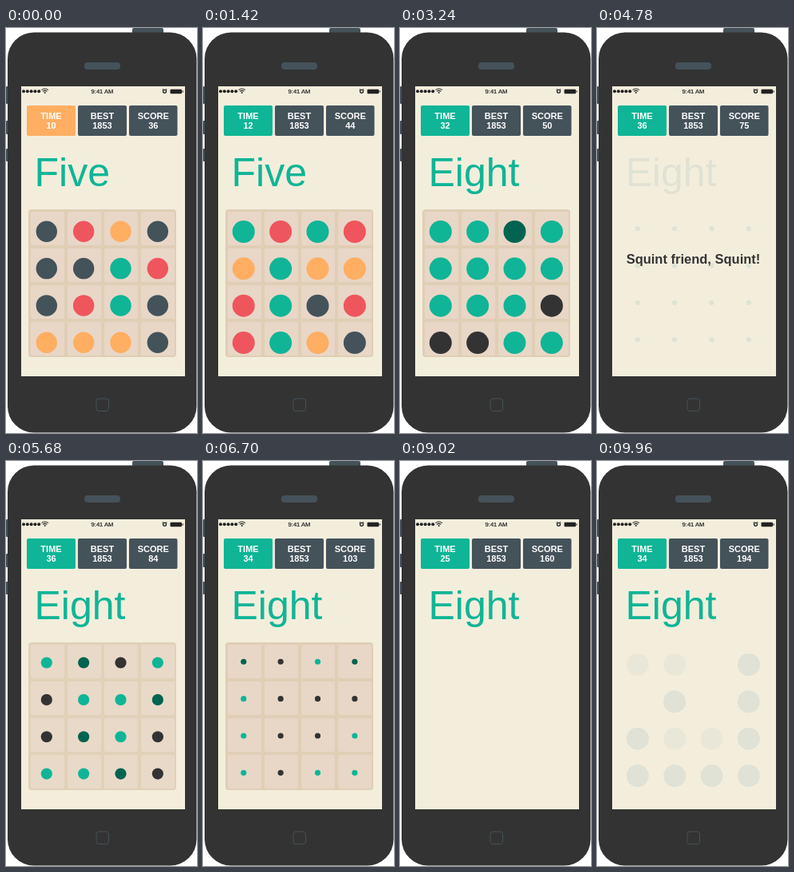
Animation of 239 by 507 pixels, one loop 9980 ms. Source, as an HTML page:

```html
<!DOCTYPE html>
<html lang="en">
<head>
<meta charset="utf-8">
<title>Dot game</title>
<style>
  html, body { margin: 0; width: 100%; height: 100%; overflow: hidden; background: #fff; }
  svg { display: block; width: 239px; height: 507px; }
  text { font-family: "Liberation Sans", Arial, sans-serif; }
  .stat { font-size: 11px; font-weight: bold; fill: #fff; text-anchor: middle; }
  .slate { fill: #44525a; }
</style>
</head>
<body>
<svg viewBox="0 0 239 507">
  <g class="slate">
    <rect x="158" y="0" width="39" height="8" rx="2"/>
    <rect x="0" y="73" width="5" height="22" rx="1"/>
    <rect x="0" y="116" width="5" height="17" rx="1"/>
    <rect x="0" y="151" width="5" height="16" rx="1"/>
  </g>
  <rect x="2" y="5.5" width="236.5" height="501" rx="33" fill="#333"/>
  <rect class="slate" x="98" y="43" width="45" height="9" rx="4"/>
  <rect x="113" y="464" width="15.5" height="15.5" rx="3" fill="none" stroke="#44525a"/>
  <rect x="19" y="73" width="205" height="363" fill="#f3eedc"/>

  <g id="status" fill="#222">
    <path d="M44.5 77.6Q48.7 74.4 52.9 77.6M46 79.4Q48.7 77.3 51.4 79.4" fill="none" stroke="#222" stroke-width="1.1"/>
    <circle cx="48.7" cy="81.1" r="1"/>
    <text x="120.5" y="82.2" font-size="7.6" text-anchor="middle" stroke="#222" stroke-width=".2">9:41 AM</text>
    <circle cx="198.5" cy="79.3" r="2" fill="none" stroke="#222" stroke-width="1.3"/>
    <path d="M195.7 77.5l1.4-1.4M201.3 77.5l-1.4-1.4" stroke="#222"/>
    <rect x="205.5" y="76.7" width="14.5" height="5.6" rx="1"/>
    <rect x="220.5" y="78.4" width="1.2" height="2.2"/>
  </g>

  <rect id="timeBox" x="26" y="97" width="61" height="38" rx="2"/>
  <rect class="slate" x="90" y="97" width="61" height="38" rx="2"/>
  <rect class="slate" x="154" y="97" width="60.5" height="38" rx="2"/>
  <g class="stat">
    <text x="56.5" y="114">TIME</text><text id="time" x="56.5" y="126"></text>
    <text x="120.5" y="114">BEST</text><text x="120.5" y="126">1853</text>
    <text x="184.3" y="114">SCORE</text><text id="score" x="184.3" y="126"></text>
  </g>

  <text id="word" x="35.5" y="198" font-size="50"></text>
  <g id="board"><rect x="28" y="227" width="185" height="185" rx="4" fill="#e0ceb5"/></g>
  <g id="dots"></g>
  <text id="message" x="120.5" y="295" font-size="16.5" font-weight="bold" fill="#333" text-anchor="middle">Squint friend, Squint!</text>
</svg>
<script>
const LOOP = 9980, R = 14, GROW = 160, SHRINK = 100, TAP = 120;
const GREEN = '#0fb596', ORANGE = '#ffae62', FAINT = '#dfe2d4';
const COLOR = {
  g: GREEN, o: ORANGE, r: '#ef555d', k: '#44525a',
  n: '#333', d: '#006450', s: FAINT, p: '#e9e8d8', '.': 'none'
};
const MESSAGE = [4500, 5050];

// start, word, score, time, cell colours, taps (hex cell + new colour), board shown
const rounds = [
  [-150, 'Five', 36, 10, 'krokkkgrkrgkoook', '2g8gdg', 1],
  [720, 'Five', 44, 12, 'rrorogoorgkrrkok', '0g2gdg', 1],
  [1540, 'Five', 47, 13, 'okrgrkogkorkgrko', '1g6g', 1],
  [2400, 'Eight', 50, 33, '', '', 0],
  [2890, 'Eight', 50, 32, 'gggggggggggnnngg', '2d7d9d0def', 1],
  [4150, 'Eight', 62, 34, 'gndggngdgnggdnnd', 'dg', 1],
  [4500, 'Eight', 75, 36, '', '', 0],
  [4745, 'Eight', 75, 36, 'ssssssssssssssss', '1p6p8pbp', 0],
  [5600, 'Eight', 84, 36, 'gdngnggdndgnggdn', '1g7g', 1],
  [6130, 'Eight', 92, 35, 'ngdggndngdngnndg', '0g5g', 1],
  [6660, 'Eight', 103, 34, 'dngdgnnngnnggngg', '1d1g', 1],
  [7260, 'Eight', 121, 31, 'gnggdngnnggdngnn', '4gdn9g', 1],
  [7820, 'Eight', 139, 29, 'ndgngdgngnndggdn', '1g8n3g', 1],
  [8380, 'Eight', 150, 27, 'gdngngdngndgngdn', '6gcg', 1],
  [8920, 'Eight', 160, 25, '', '', 0],
  [9100, 'Eight', 177, 30, 'ssps.spss.psspss', '2s7p', 0],
  [9560, 'Eight', 194, 34, 'pp.s.s.ssppsssss', '', 0]
].map(([start, word, score, time, cells, taps, board], i, all) => {
  const end = i + 1 < all.length ? all[i + 1][0] : LOOP + 200;
  const steps = taps.match(/../g) || [];
  const gap = (end - start - 300) / steps.length;
  return {
    start, end, word, score, time, cells, board,
    taps: steps.map(([cell, color], k) => ({ cell: parseInt(cell, 16), color, at: start + 170 + gap * k }))
  };
});

const $ = id => document.getElementById(id);
const clamp = v => Math.max(0, Math.min(1, v));
const add = (parent, tag, attrs = {}) => {
  const el = document.createElementNS('http://www.w3.org/2000/svg', tag);
  for (const k in attrs) el.setAttribute(k, attrs[k]);
  return parent.appendChild(el);
};

for (let i = 0; i < 5; i++) add($('status'), 'circle', { cx: 22 + 4.8 * i, cy: 79.3, r: 2 });

const dots = Array.from({ length: 16 }, (_, i) => {
  const col = i % 4, row = i >> 2;
  add($('board'), 'rect', { x: 31 + 46 * col, y: 230 + 46 * row, width: 42, height: 42, rx: 2, fill: '#e8d7c7' });
  return {
    x: 50.8 + 46.35 * col, y: 250 + 46.35 * row,
    base: add($('dots'), 'circle'), top: add($('dots'), 'circle')
  };
});

function place(el, dot, r, color) {
  el.setAttribute('cx', dot.x);
  el.setAttribute('cy', dot.y + 5 * r / R);
  el.setAttribute('r', r);
  el.setAttribute('fill', COLOR[color] || 'none');
}

function drawDots(round, t) {
  const size = R * Math.min(clamp((t - round.start) / GROW), clamp((round.end - t) / SHRINK));
  dots.forEach((dot, i) => {
    let under = round.cells[i], over = under, grown = 1;
    for (const tap of round.taps) {
      if (tap.cell !== i || t < tap.at) continue;
      under = over;
      over = tap.color;
      grown = clamp((t - tap.at) / TAP);
    }
    place(dot.base, dot, size, grown < 1 ? under : over);
    dot.top.setAttribute('cx', dot.x);
    dot.top.setAttribute('cy', dot.y + 5 * size / R);
    dot.top.setAttribute('r', grown < 1 ? size * grown : 0);
    dot.top.setAttribute('fill', COLOR[over] || 'none');
  });
}

function draw(now) {
  const t = now % LOOP;
  const index = rounds.findIndex(r => t < r.end);
  const round = rounds[index], last = rounds[Math.max(0, index - 1)];
  const fade = clamp((t - round.start) / 90);
  const squint = t >= MESSAGE[0] && t < MESSAGE[1];

  $('time').textContent = round.time;
  $('score').textContent = round.score;
  $('timeBox').setAttribute('fill', round.time > 10 ? GREEN : ORANGE);
  $('word').textContent = round.word;
  $('word').setAttribute('fill', squint ? FAINT : GREEN);
  $('board').setAttribute('opacity', last.board + (round.board - last.board) * fade);
  $('message').setAttribute('opacity', Math.min(clamp((t - MESSAGE[0]) / 100), clamp((MESSAGE[1] - t) / 100)));
  drawDots(round, t);
}

const origin = performance.now();
function frame() {
  draw(performance.now() - origin);
  requestAnimationFrame(frame);
}
frame();
</script>
</body>
</html>
```
